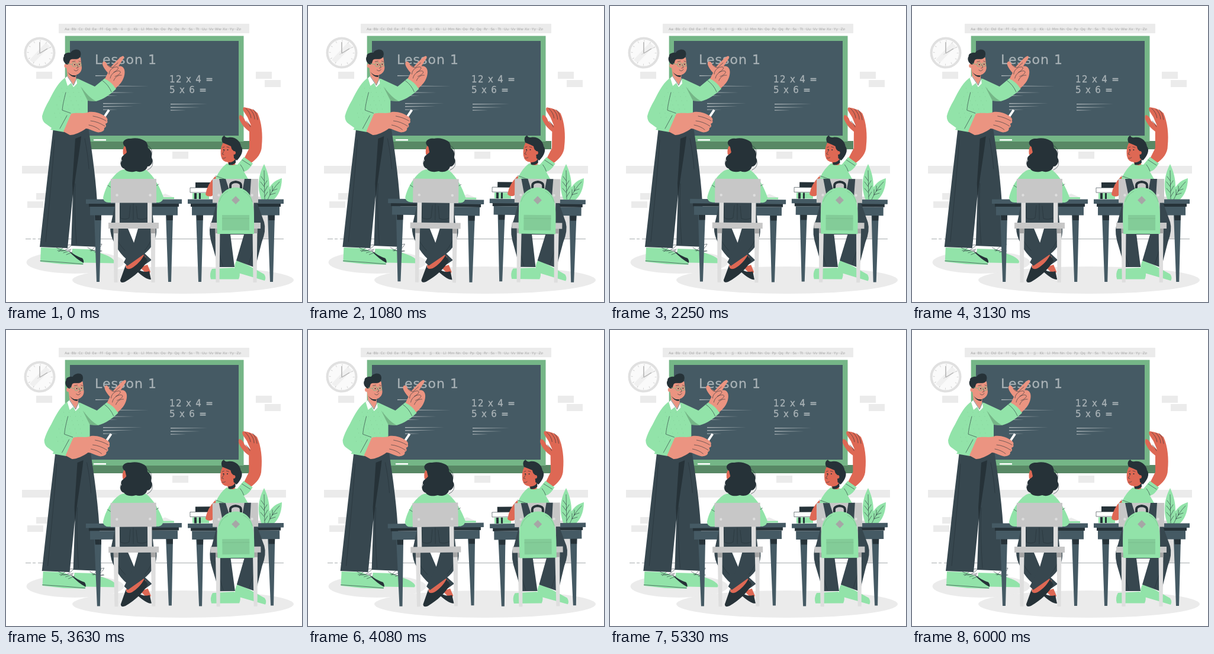
Recreate the animation shown at these times as an HTML page. Size 500x500 px, loop 6040 ms.

```html
<!DOCTYPE html>
<html lang="en">
<head>
<meta charset="utf-8">
<title>Classroom</title>
<style>
  html, body { margin: 0; width: 100%; height: 100%; overflow: hidden; background: #fff; }
  svg { display: block; width: 100%; height: 100%; }
  .ink { fill: #263238; }
  .navy { fill: #37474f; }
  .slate { fill: #455a64; }
  .green { fill: #92e3a9; }
  .tan { fill: #eb9481; }
  .red { fill: #de6854; }
  .pale { fill: #ebebeb; }
  .light { fill: #dedede; }
  .grey { fill: #c7c7c7; }
  .mid { fill: #a6a6a6; }
  .white { fill: #fff; }
  .line { fill: none; stroke: #263238; stroke-width: .6; stroke-linecap: round; stroke-linejoin: round; }
  .chalk { fill: #a9b2b6; stroke: #a9b2b6; stroke-width: .3; font-family: "DejaVu Sans", sans-serif; }
</style>
</head>
<body>
<svg viewBox="0 0 500 500">
  <defs>
    <g id="desk">
      <path class="slate" d="M149 352h12l-3 114h-5zM270 352h12l-3 114h-5z"/>
      <path class="ink" d="M150 352h11l-.4 10h-10zM271 352h11l-.4 10h-10zM140 333h152v6H140z"/>
      <path class="slate" d="M135 326.500h162v7.500H135zM142 339h148v14.500H142z"/>
    </g>
    <g id="chair">
      <path class="light" d="M184.500 330h7.500v37h-7.500zM239 330h7.500v37H239zM181.500 375h8l-1 92h-6zM244.500 375h8l-1 92h-6z"/>
      <path class="mid" d="M181.500 375h8v9h-7.700zM244.500 375h8v9h-7.700z"/>
      <path class="grey" d="M177 292h77v40.500h-77zM173 366h85v10h-85z"/>
      <g class="light"><circle cx="187.500" cy="319.500" r="2.200"/><circle cx="243.500" cy="319.500" r="2.200"/></g>
    </g>
  </defs>

  <!-- room -->
  <path class="pale" d="M89 30h322v16H89zM51 111h27v12H51zM422 111h27v12h-27zM437 125h27v12h-27zM281 246h27v12h-27zM51 316h27v11H51zM36 330h27v11H36zM27 270h446v13H27z"/>
  <g id="letters" fill="#a6a6a6" font-size="5.800" font-family="'DejaVu Sans', sans-serif" text-anchor="middle"></g>
  <path d="M99 39h299" stroke="#bdbdbd" stroke-width=".5"/>
  <circle cx="57" cy="79" r="24.500" fill="#fafafa" stroke="#e0e0e0" stroke-width="4"/>
  <path d="M40 91l27-29 7 6-27 28z" fill="#f0f0f0"/>
  <circle cx="57" cy="79" r="20" fill="none" stroke="#c7c7c7" stroke-width="3" stroke-dasharray=".7 9.772"/>
  <path d="M57 80V61M57 80l13-8" stroke="#a6a6a6" stroke-width="1.300"/>
  <path d="M53 82l23-13" stroke="#c7c7c7" stroke-width=".7"/>
  <path d="M33 393.500h9m3 0h5m4 0h415" stroke="#263238" stroke-width=".5" opacity=".8"/>
  <ellipse class="pale" cx="117" cy="433" rx="82.500" ry="19"/>
  <ellipse class="pale" cx="299" cy="463" rx="187" ry="23"/>

  <!-- board -->
  <path fill="#588865" d="M99.700 228H411v14H99.700z"/>
  <path fill="#75b687" d="M99.700 50.500h301.800V229H99.700z"/>
  <path class="slate" d="M108 59h285v160H108z"/>
  <path class="white" d="M148 225h21v2.500h-21z"/>
  <g class="chalk">
    <text x="150" y="98" font-size="22" letter-spacing="1.050">Lesson 1</text>
    <text x="276" y="129" font-size="15" letter-spacing="1.350">12 x 4 =</text>
    <text x="276" y="147" font-size="15" letter-spacing="1.350">5 x 6 =</text>
    <path stroke="none" d="M151 117l42 .8-42 .7zM163 134.500l78 .7-78 .8zM163 145.500l54 .6-54 .8zM163 151l26 .5-26 .7zM164 164l66 .7-66 .8zM164 169l51 .6-51 .8zM164 174.500l25 .5-25 .7zM278 165l62 .7-62 .8zM278 170.500l50 .6-50 .8zM278 175.500l26 .5-26 .7z"/>
  </g>

  <!-- plant -->
  <path class="light" d="M424 322h23l-3 71h-17z"/>
  <path class="green" d="M432 328C425 310 424 290 436 267C447 290 447 311 441 328zM438 328C441 308 449 296 466 291C466 309 459 322 451 328z"/>
  <path class="line" d="M436 278l1 48m-1-31l-5-7m5 17l-6-8m6 18l-6-7m6-5l5-8m-4 18l5-9m-5 18l5-8M442 327Q450 309 462 297m-16 22v-9m4 3v-9m-4 15l9-3m-5-4l8-3"/>

  <g id="teacher">
    <path class="green" d="M112 410L145 411C155 418 172 419 181 428Q185 432 182 434.500L131 433.500 110 428z"/>
    <path class="green" d="M59 408L92 409C104 413 114 421 128 426Q132 431 130 437L94 436 58 432z"/>
    <path class="ink" d="M105 413C113 418 121 424 129 426Q132 430 131 434Q119 428 105 413z"/>
    <path class="line" d="M58 430.500l37 2.500 35 3M84 407c10 8 14 7 26 4M87 413c10 3 15-1 24-9c-8-2-14 3-22 11M97 417l12-4m-7 7l10-4M138 408c9 6 15 8 24 6M142 413c10 1 17-3 20-11c-8 1-13 5-18 12m6 2l11-3"/>
    <path class="navy" d="M80 205L139 205C146 250 153 300 155 350L157 407 110 405 113 318 104 409 57 407 70 290z"/>
    <path class="ink" d="M117 224L127 220C124 250 117 285 113 325L112 300z"/>
    <path class="line" d="M82 226C78 285 72 345 67 398M133 224C137 245 139 260 140 275M117 300C115 335 117 370 119 402"/>
    <path class="green" d="M102 120C90 126 81 143 73 159Q64 174 61 186Q61 194 66 198L77 206 75 209 98 213 112 183 138 181 138 160 152 161C164 158 177 149 186 140Q180 127 167 122L150 136 122 123z"/>
    <path d="M126 136C135 147 143 157 153 161L138 160z" fill="#75b687"/>
    <g id="dots" fill="#75b687"></g>
    <path class="line" d="M101 146C98 158 96 166 95 176L109 181M91 207l12-22M163 126q10 7 15 19"/>
    <path class="tan" d="M102 103L119 111 118 124 114 133 104 119z"/>
    <path class="ink" d="M104 111Q109 118 118 117L117 120Q109 120 104 111z"/>
    <path class="tan" d="M101 93C100 102 104 114 112 117C121 118 128 112 128 104L126 87 104 88z"/>
    <circle class="tan" cx="102" cy="101" r="3.600"/>
    <path class="ink" d="M103 99C97 96 95 89 98 85C97 81 103 78 109 79C111 74 121 71 125 76C128 81 126 87 122 89C115 91 110 88 108 92L106 98z"/>
    <path class="white" d="M104 118L114 133 119 122 120 131 114 137 110 130 104 135 100 122z"/>
    <path class="line" d="M104 119l10 15 5-11M115 108q4 4 7-1M120 99l2 5-3 1M112 94l5-1m6 0l3 1"/>
    <g fill="none" stroke="#75b687" stroke-width=".8"><circle cx="115.500" cy="99" r="3.600"/><circle cx="124" cy="99" r="3.200"/><path d="M112 99l-8-2"/></g>
    <g class="ink"><circle cx="116" cy="99" r="1"/><circle cx="124" cy="98.500" r="1"/></g>
    <path class="tan" d="M167 123L172 113C168 108 162 101 163 96C165 91 169 94 171 99L177 103C184 96 192 86 197 84.500C200 84 200 88 197 91L190 102C197 100 201 106 200.500 113C200 122 195 131 185 139Q178 128 167 123z"/>
    <path class="line" d="M171 99q3 5 9 5l9-8M174 115c0-7 8-13 14-12c4 1 0 6-6 9M176 122c1-8 11-14 16-12c4 2-2 7-8 9M182 126c2-6 8-10 13-9"/>
    <path d="M165 189l9-13.500" stroke="#fff" stroke-width="4"/>
    <path class="tan" d="M110 182C121 179 132 183 140 179C151 178 159 181 167 186Q173 190 171 194Q173 197 168 199Q171 204 166 206Q167 213 156 213.500C147 212 141 207 135 207C127 213 116 218 108 218L97 212z"/>
    <path class="line" d="M147 186q12 2 22 8M143 194q12 1 24 9M140 201q11 2 18 8"/>
  </g>

  <g id="girl">
    <use href="#desk"/>
    <path class="pale" d="M254 323l15-6 16 7z"/>
    <path class="green" d="M259 323h25v3h-25z"/>
    <path class="green" d="M193 278Q207 272 237 277C250 287 260 306 266 323Q265 331 258 332H174Q165 332 164 324C168 305 180 286 193 278z"/>
    <path class="line" d="M172 303l6 4m75-3l5-3"/>
    <path class="red" d="M226 441l13-4 5 12-4 6z"/>
    <path class="ink" d="M222 444q9 7 20 4l3 14q-8 1-25-15z"/>
    <path class="navy" d="M185 332H246L250 376H225L217 402 246 429 226 443C203 431 190 416 183 400Q176 388 176 374z"/>
    <path class="red" d="M202 438Q217 430 230 418L236 424Q222 445 205 450z"/>
    <path class="ink" d="M202 438Q202 447 212 443C221 438 229 429 233 421L239 430C230 445 218 456 201 466Q193 469 193 463z"/>
    <path class="navy" d="M222 376L246 360 254 376Q255 388 249 401Q243 412 232 420L205 439 199 433Q207 418 214 404z"/>
    <path class="white" d="M206 376h17l-7 24z"/>
    <path class="line" d="M215 334v27M193 338v20q8 4 15 0l2-21M220 338l2 21q9 3 16-1M184 388q7 15 17 25m46-22q-5 13-13 22"/>
    <use href="#chair"/>
    <path class="red" d="M205 232C197 237 197 244 198 251Q201 253 206 252z"/>
    <path class="ink" d="M202 238C193 231 200 223 211 224C219 222 228 224 233 227C240 230 239 236 240 240C248 245 246 252 246 256C250 263 245 271 239 271C237 279 227 282 220 279C210 282 202 279 200 275C192 272 193 264 196 261C192 254 202 251 204 247z"/>
    <path class="line" d="M238 235q11 5 8 17m1 7q4 13-8 18m-41-4q-8-6-2-15"/>
  </g>

  <g id="boy">
    <use href="#desk" x="172"/>
    <path class="ink" d="M320 298h26v9h-26z"/>
    <path class="white" d="M312 307h30v8h-30z"/>
    <path class="line" d="M343 307h-32v8h32"/>
    <path class="green" d="M315 316h28v10h-28z"/>
    <path class="ink" d="M318 316h4v10h-4zM326 316h3v10h-3z"/>
    <path class="red" d="M400 262L413 266C424 258 432 249 432 236C434 218 432 196 425 181Q418 173 402 171Q399 172 401 177L408 188 414 202 404 194Q401 185 395 184Q392 188 396 195Q401 205 411 212L411 240z"/>
    <path class="line" d="M405 173q8 7 9 16m-2-15q8 8 8 17m-2-16q6 7 7 17m-19 2q5 4 7 10"/>
    <path class="red" d="M353 288Q340 301 337 318Q339 323 348 321L367 293z"/>
    <path class="green" d="M373 266L391 268 402 255 417 266Q410 278 402 280L410 294 408 332H366L354 291Q362 274 373 266z"/>
    <path class="line" d="M399 260l14 9M354 287l17 6m25-25q4 5 6 11"/>
    <path class="red" d="M374 256l14-2-1 14q-6 3-12-2z"/>
    <path class="ink" d="M376 264q7 1 12-6v7q-6 5-12 3z"/>
    <path class="red" d="M367 230C363 238 362 243 363 253Q365 264 376 264Q384 263 388 251L387 233z"/>
    <path class="ink" d="M366 231C363 225 365 220 369 219Q371 223 376 222C387 220 396 228 397 237C402 243 398 253 390 261L385 257 384 244Q381 243 380 237Q374 234 366 231z"/>
    <circle class="red" cx="385" cy="248" r="3"/>
    <g class="ink"><circle cx="368" cy="243" r="1.100"/><circle cx="374.500" cy="243" r="1"/></g>
    <path class="line" d="M366 239l3-1m4 0l4 1m-8 5l-4 6 3 1m-2 6q3 1 5-1"/>
    <path class="green" d="M348 444L384 442 394 447Q396 455 393 461.500H346Q343 452 348 444zM390 429L411 439 436 453Q440 459 437 464L386 449Q385 436 390 429z"/>
    <path class="navy" d="M356 332H424L436 365Q440 379 432 399L421 442 389 430 402 386H379L386 441H359L346 396Q341 376 348 362z"/>
    <path class="line" d="M352 390l14 49m59-49l-15 46"/>
    <use href="#chair" x="172"/>
    <path class="navy" d="M360 292h11l7 22-12 8zM403 292h11l-2 30-13-8z"/>
    <path d="M379 308v-5q0-5 9-6 9 1 9 6v5" fill="none" stroke="#263238" stroke-width="4"/>
    <path class="green" d="M357 385C356 355 355 336 361 323Q370 307 388 306.500Q406 307 414 323C420 337 419 357 419 385z"/>
    <path fill="#83cc98" d="M365 353h46v26h-46z"/>
    <path d="M365 359h46M360 331q4-13 15-18M401 313q11 5 15 18" fill="none" stroke="#75b687" stroke-width=".6"/>
    <path class="mid" d="M388 321l7 7-7 7-7-7z"/>
  </g>
</svg>
<script>
  const LOOP = 6040, CYCLE = 6000;
  const SHAKE = [0, -1, 2, -4, 4, -4, 4, -4, 2, -1, 0];
  const SWAY = [0, 1, 0, -1, 0];
  const $ = id => document.getElementById(id);

  // Linear interpolation through evenly spaced keys, u from 0 to 1.
  function along(keys, u) {
    const p = u * (keys.length - 1), i = Math.min(Math.floor(p), keys.length - 2);
    return keys[i] + (keys[i + 1] - keys[i]) * (p - i);
  }

  $('letters').innerHTML = [...'ABCDEFGHIJKLMNOPQRSTUVWXYZ'].map((c, i) =>
    `<text x="${103 + i * 11.6}" y="40.500">${c + c.toLowerCase()}</text>`).join('');

  let dots = '';
  for (let row = 0; row < 8; row++)
    for (let col = 0; col < 5; col++)
      dots += `<circle cx="${94 - row * 2 + col * 9 + row % 2 * 4}" cy="${139 + row * 7}" r=".4"/>`;
  $('dots').innerHTML = dots;

  function draw(now) {
    const u = Math.min(now % LOOP / CYCLE, 1), angle = along(SWAY, u);
    $('teacher').setAttribute('transform', `translate(${along(SHAKE, u)})`);
    $('girl').setAttribute('transform', `rotate(${angle} 216 345)`);
    $('boy').setAttribute('transform', `rotate(${angle} 388 319)`);
    requestAnimationFrame(draw);
  }
  draw(0);
</script>
</body>
</html>
```
